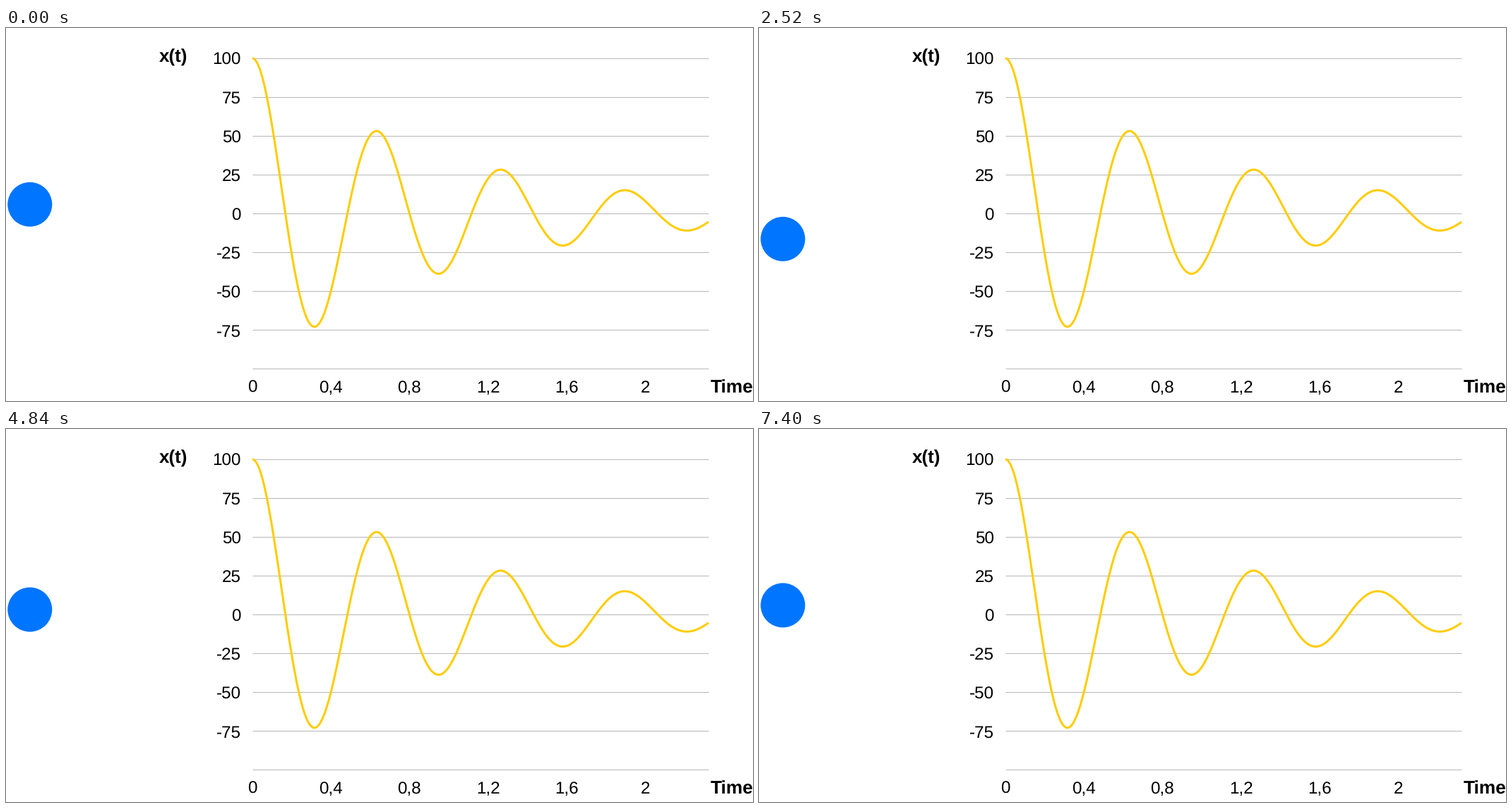
These frames come from a looping animation (1058x529 px, 7.44 s). A matplotlib script:

```python
import numpy as np
import matplotlib
import matplotlib.pyplot as plt
from matplotlib.animation import FuncAnimation
from matplotlib.patches import Circle

matplotlib.rcParams["font.family"] = "Liberation Sans"
matplotlib.rcParams["text.hinting"] = "none"

W, H, DPI = 1058, 529, 100
STEP, FRAMES = 40, 186            # ms per frame, frames per loop

LEFT, RIGHT, TOP, ROW = 348.9, 995, 43.0, 55.04
MID = TOP + 4 * ROW               # height of x = 0
SEC = 278.4                       # pixels per unit of time
OMEGA = np.sqrt(99)

REST, AMP = 250.2, 209.5          # ball's resting height and pull
RISE_START, RISE_END, RELEASE = 40, 700, 1520
HOLDS = (1600, 2400, 3400, 3720, 4320, 4960, 5280, 6400, 6800)


def swing(t):
    """Damped oscillation released at rest from 1."""
    return np.exp(-t) * (np.cos(OMEGA * t) + np.sin(OMEGA * t) / OMEGA)


fig = plt.figure(figsize=(W / DPI, H / DPI), dpi=DPI, facecolor="white")
ax = fig.add_axes([0, 0, 1, 1])
ax.set_xlim(0, W)
ax.set_ylim(H, 0)
ax.axis("off")


def px(size):
    return size * 72 / DPI


def label(x, y, text, size=24.2, **kw):
    ax.text(x, y, text, fontsize=px(size), color="black", va="baseline", **kw)


for i in range(9):
    y = TOP + i * ROW
    ax.plot([LEFT, RIGHT], [y, y], color="#b7b7b7", lw=px(1),
            solid_capstyle="butt")
    if i < 8:
        label(333, y + 9.2, str(100 - 25 * i), ha="right")

for i, text in enumerate(("0", "0,4", "0,8", "1,2", "1,6", "2")):
    label(LEFT - 0.4 + i * 0.4 * SEC, 517, text, ha="center")

label(216.5, 48.3, "x(t)", 26, weight="bold", ha="left")
label(997.6, 518, "Time", 26.2, weight="bold", ha="left")

t = np.linspace(0, (RIGHT - LEFT) / SEC, 800)
ax.plot(LEFT + t * SEC, MID - 4 * ROW * swing(t), color="#ffcc00",
        lw=px(3), solid_capstyle="butt", zorder=3)

ball = Circle((33.8, REST), 31.5, color="#0075ff", lw=0, zorder=4)
ax.add_patch(ball)


def height(ms):
    """Ball displacement, 1 at the top of the pull."""
    if ms <= RELEASE:
        p = np.clip((ms - RISE_START) / (RISE_END - RISE_START), 0, 1)
        return (1 - np.cos(np.pi * p)) / 2
    # a few steps repeat the pose before them
    n = (ms - RELEASE) / STEP - sum(h <= ms for h in HOLDS)
    return swing(0.0076 + 0.045 * n)


def draw(frame):
    ball.center = (33.8, REST - AMP * height(frame * STEP))
    return (ball,)


anim = FuncAnimation(fig, draw, frames=FRAMES, interval=STEP,
                     repeat=True, repeat_delay=0, blit=False)
plt.show()
```
